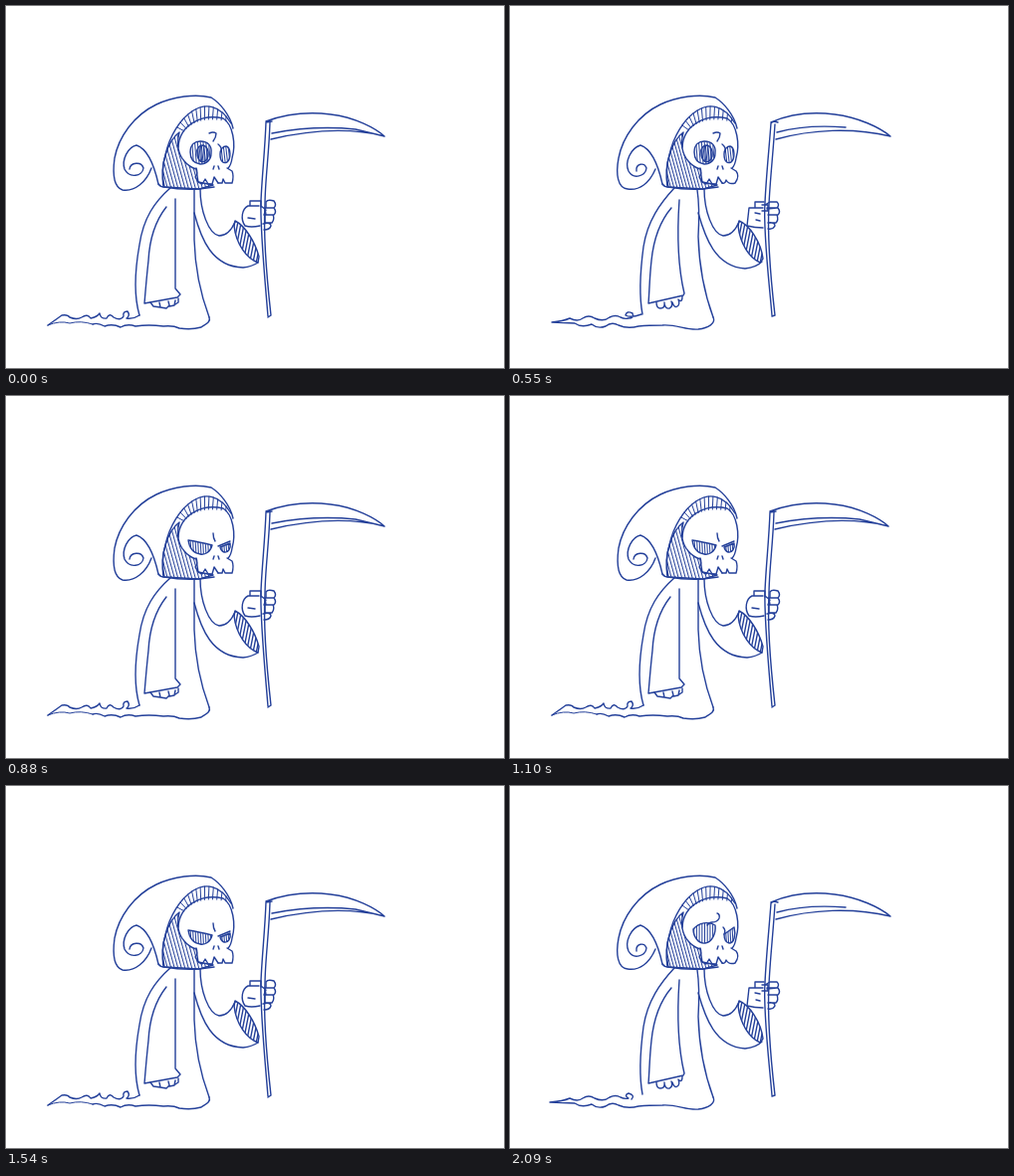
These frames come from a looping animation (500 by 364 pixels, 2.2 s). An HTML page:

```html
<!DOCTYPE html>
<html lang="en">
<head>
<meta charset="utf-8">
<title>Little reaper</title>
<style>
  html, body { margin: 0; width: 100%; height: 100%; overflow: hidden; background: #fff; }
  svg { display: block; width: 100vw; height: 100vh; }
  path { fill: none; stroke: #24409a; stroke-width: 1.4; stroke-linecap: round; stroke-linejoin: round; }
  clipPath path { stroke: none; fill: #000; }
  .fine { stroke-width: 1; }
</style>
</head>
<body>
<svg id="stage" viewBox="0 0 500 364"></svg>
<script>
const STEP = 110, COUNT = 20;
const stage = document.getElementById('stage');
let clipCount = 0;

const line = (d, cls = '') => `<path class="${cls}" d="${d}"/>`;

// Slanted strokes clipped to an outline, plus the outline itself.
function hatched(d, [x, y, w, h], gap, lean, cls = '') {
  const id = 'clip' + clipCount++;
  let strokes = '';
  for (let i = x - Math.abs(lean); i <= x + w + Math.abs(lean); i += gap) {
    strokes += `M${i},${y}l${lean},${h}`;
  }
  return `<clipPath id="${id}"><path d="${d}"/></clipPath>` +
    `<g clip-path="url(#${id})">${line(strokes, cls)}</g>` + line(d);
}

function bezier(p, t) {
  const u = 1 - t;
  const axis = k => u*u*u*p[0][k] + 3*u*u*t*p[1][k] + 3*u*t*t*p[2][k] + t*t*t*p[3][k];
  return axis(0).toFixed(1) + ',' + axis(1).toFixed(1);
}

function hoodRim(shift) {
  const outer = [[160, 150], [168, 112], [203, 80], [226, 118]];
  const inner = [[173, 142], [174, 120], [196, 108], [225, 117]];
  let ribs = '';
  for (let t = .27 + shift; t < .97; t += .055) {
    ribs += `M${bezier(outer, t)}L${bezier(inner, t + .02)}`;
  }
  return line(ribs, 'fine') + line('M158,182C156,168 157,159 160,150C168,112 203,80 226,118');
}

const hood = b => line(
  'M228,123C225,109 214,97 206,92C190,88 168,91 151,99C128,110 113,132 109,153' +
  (b ? 'C106,169 108,183 118,184C130,186 140,178 146,164'
     : 'C107,168 108,182 117,185C129,187 141,177 146,163') +
  'M153,179Q155,182 159,182Q176,185 194,184L209,182') +
  line(b
    ? 'M153,179C149,161 143,144 131,140C121,143 115,157 119,166C124,175 136,171 137,163C135,157 126,158 127,166'
    : 'M153,179C149,161 143,144 131,140C122,142 116,155 119,164C124,174 137,171 138,163C136,156 125,157 124,164') +
  hoodRim(b ? .02 : 0);

function skull(b) {
  const shade = 'M160,150C163,140 167,132 174,127C171,139 173,149 179,156Q184,162 191,164L193,177L208,180L194,184L159,182C157,172 157,160 160,150Z';
  return hatched(shade, [156, 124, 54, 62], b ? 3.2 : 3.5, 17, 'fine') +
    line('M173,142C174,120 196,108 218,113C228,119 231,139 227,153Q226,160 223,163') +
    line('M191,163Q193,168 190,172L193,177L197,179L200,174L203,179L207,179L209,172L213,178') +
    line(b
      ? 'M213,178Q216,179 217,175Q220,180 226,178Q231,171 227,166L222,163'
      : 'M213,178H217L218,174L220,178H227Q229,171 227,166L222,163') +
    line('M209,161l-1,3M213,161l1,3');
}

const eyes = {
  open: () =>
    hatched('M185,147C185,139 190,136 195,136C203,136 207,141 206,148C206,155 201,159 195,159C188,158 185,153 185,147Z',
      [183, 135, 25, 26], 2.8, 2, 'fine') +
    hatched('M192,148C191,143 194,140 198,140C202,141 204,146 203,151C202,156 198,158 195,156Q192,153 192,148Z',
      [191, 139, 14, 20], 2.4, 2, 'fine') +
    hatched('M215,149C215,144 218,141 221,141C226,142 226,154 222,157C218,159 215,156 215,149Z',
      [213, 140, 13, 18], 2.4, 2, 'fine') +
    line('M204,128Q208,126 211,128Q211,132 208,136M213,139Q217,142 216,146'),
  half: () =>
    hatched('M184,144C190,137 199,136 206,140C207,148 203,157 196,158C189,159 184,151 184,144Z',
      [182, 135, 26, 25], 2.7, 0, 'fine') +
    hatched('M215,149L225,142C227,150 225,158 220,158C216,157 215,153 215,149Z',
      [213, 141, 14, 18], 2.2, 1, 'fine') +
    line('M208,128Q211,129 210,133Q208,137 203,137Q200,137 198,140M214,142Q217,145 215,149'),
  narrow: () =>
    hatched('M183,145C190,146 199,148 207,150C205,157 200,160 195,159C187,158 184,152 183,145Z',
      [181, 143, 28, 18], 2.5, 1, 'fine') +
    hatched('M215,152L225,148C226,153 223,158 219,157Q216,156 215,152Z',
      [213, 146, 14, 13], 2.2, 1, 'fine') +
    line('M208,138Q208,143 210,146M213,151L225,146')
};

const robe = b => line(b
  ? 'M165,183C151,198 138,216 134,242C130,272 130,294 133,310' +
    'M162,203C151,216 144,236 142,256C140,274 140,287 139,299L174,291L175,289C170,268 167,238 170,195' +
    'M188,185C190,198 190,214 189,232C190,265 197,294 204,313'
  : 'M166,182C149,197 138,213 134,240C129,268 129,294 134,311' +
    'M161,202C150,216 144,236 143,256C141,274 140,287 139,299L172,293L175,290L170,284V194' +
    'M189,185V235C190,270 198,297 204,313') +
  line(b
    ? 'M147,298q0,6 4,6q5,0 4,-6m0,1q1,6 5,5q4,-2 2,-7m1,1q2,6 5,4q3,-2 1,-7m1,1q3,2 3,-4'
    : 'M145,298l3,4l7,1l-1,-5m1,5l6,1l3,-3l-1,-4m1,5l5,-1l1,-5m0,4l3,-2v-4');

const tail = (b, half) => line(b
  ? `M204,313C207,319 199,324 189,325C176,326 168,320 153,321Q139,321 129,322` +
    `Q118,325 109,321Q102,317 96,322Q88,325 82,320Q72,324 65,319L${half ? 40 : 42},318` +
    'Q53,317 60,314Q68,318 73,314Q79,310 85,314Q94,318 100,313Q106,310 111,313Q115,315 119,314' +
    (half ? 'Q114,311 119,309Q126,311 122,315' : 'Q125,314 123,309Q117,306 116,311Q121,314 132,310')
  : 'M204,313C206,318 200,320 196,323Q186,326 174,324Q168,321 158,322Q143,320 130,322Q122,319 115,323' +
    'Q107,319 99,322Q92,318 87,320') +
  (b ? '' : line('M87,320Q75,316 64,319Q54,316 42,321', 'fine') + line(
    'M42,321Q52,314 56,311Q62,310 64,313Q71,316 76,313Q82,309 85,314Q91,313 94,309Q95,315 101,314' +
    'Q104,308 108,313Q115,317 118,312Q117,307 122,307Q125,311 121,314Q128,315 134,311'));

const arm = b => line(
  'M195,184C195,205 203,229 214,231C222,231 227,224 230,217' +
  (b ? 'M189,208C196,233 206,262 236,264Q247,263 253,257'
     : 'M189,208C196,235 207,262 238,263Q247,262 253,258')) +
  hatched(b
    ? 'M230,216C240,220 252,237 254,254L251,258C240,253 231,239 229,221Z'
    : 'M230,216C240,221 250,237 254,252L253,258C242,254 231,240 229,221Z',
    [226, 214, 32, 46], 3.3, -9);

const hand = b => line(b
  ? 'M238,221L240,203L254,203M238,221Q246,223 254,223M246,202V197H255M246,208l5,1M247,215l4,1' +
    'M256,200l5,-3l7,0q3,3 0,6l-10,1M258,203l11,0q3,4 0,7l-10,0M260,210l8,0q2,5 -1,8l-8,0M259,218q7,-1 7,3q-2,4 -7,3M253,200h6v6h-6'
  : 'M240,221C235,214 237,204 243,201H254M240,221Q246,223 255,221M245,201V196H256V202M243,213l7,1' +
    'M261,197q2,-3 8,-1q3,4 0,7h-8zM260,203h9q3,4 0,7h-8zM260,210h8q2,4 -1,8h-7zM258,219q8,-2 8,2q-1,4 -7,4M256,201l5,4l-2,5');

const scythe = b => line(b
  ? 'M262,118C260,145 257,174 256,198C254,226 260,276 263,311M266,119C264,150 261,176 260,200C258,235 262,276 266,311L263,312' +
    'M262,118Q264,115 269,117M262,117C280,109 302,106 326,109C350,112 371,122 382,131' +
    'C344,122 303,124 267,134M268,127C290,121 313,120 337,122'
  : 'M261,117C260,145 257,171 256,196C255,225 260,275 263,312M265,117C264,150 260,176 260,200C258,235 262,275 266,311L263,313' +
    'M261,117L267,116M261,116C280,109 302,106 326,109C351,112 371,123 380,131' +
    'C345,122 304,125 266,134M267,128C293,123 322,121 351,124L380,131');

const figure = (b, mood) => '<g display="none">' + hood(b) + skull(b) + eyes[mood]() +
  robe(b) + tail(b, mood === 'half') + arm(b) + scythe(b) + hand(b) + '</g>';

const poses = [[0, 'open'], [1, 'open'], [1, 'half'], [0, 'narrow'], [1, 'narrow']];
stage.innerHTML = poses.map(([b, mood]) => figure(b, mood)).join('');
const drawings = [...stage.children];

function poseAt(step) {
  if (step === 7 || step === 19) return 2;
  return (step < 7 ? 0 : 3) + step % 2;
}

const start = performance.now();
function render() {
  const elapsed = Math.max(0, performance.now() - start);
  const current = poseAt(Math.floor(elapsed / STEP) % COUNT);
  drawings.forEach((g, i) => g.setAttribute('display', i === current ? 'inline' : 'none'));
  requestAnimationFrame(render);
}
render();
</script>
</body>
</html>
```
